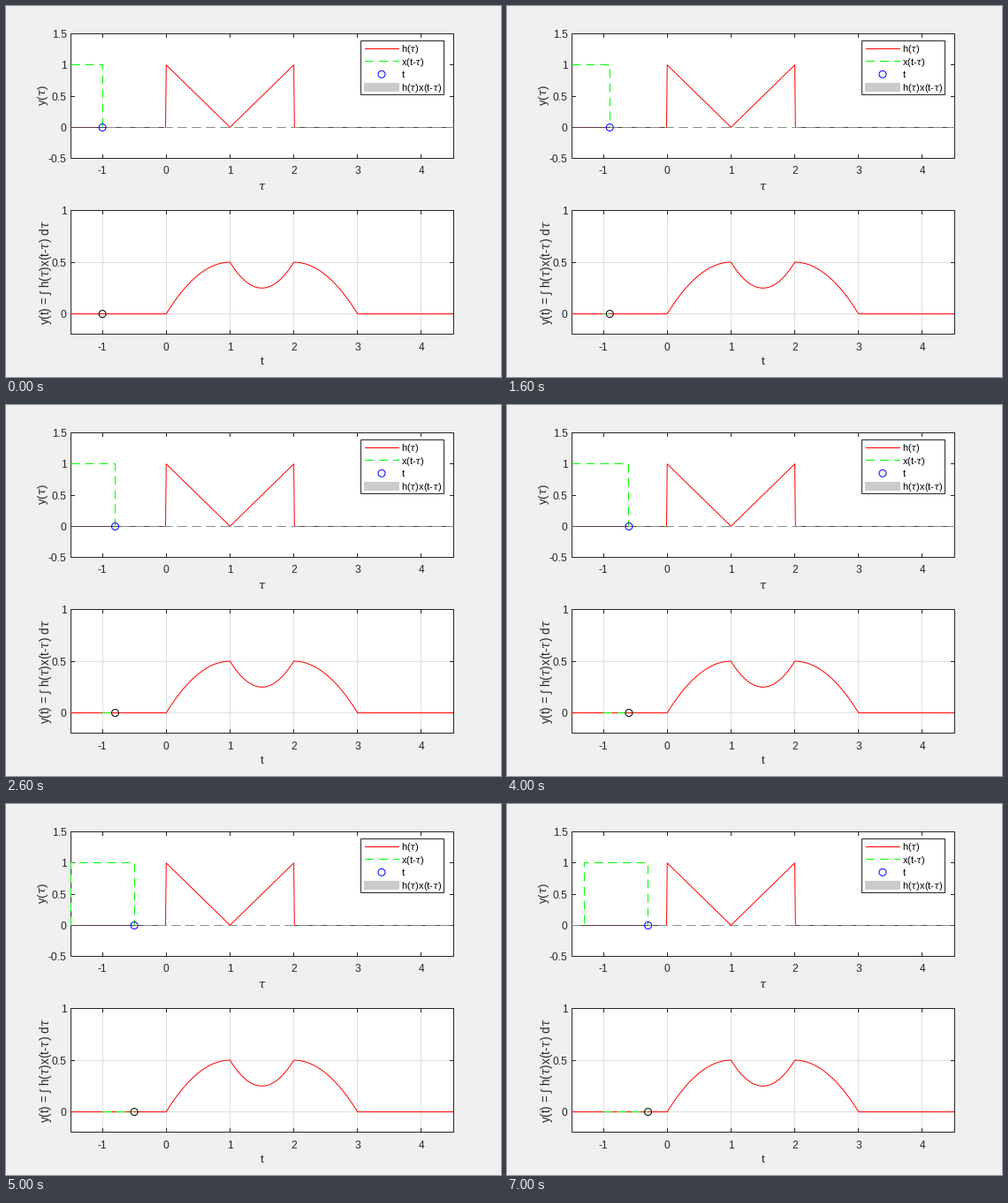
These frames come from a looping animation (560x420 px, 8000 ms). A matplotlib script:

```python
import numpy as np
import matplotlib.pyplot as plt
from matplotlib.animation import FuncAnimation
from matplotlib.patches import Circle, Rectangle

W, H, DPI = 560, 420, 100
PX = 72 / DPI
STEPS, STEP_MS = 8, 1000
INK = (38 / 255,) * 3
GRID = (223 / 255,) * 3
RED, GREEN, BLUE = "#ff0000", "#00ff00", "#0000ff"
DARK, GRAY, AREA = "#603c3c", "#8c8c8c", "#cbcbcb"
LEFT, RIGHT = 73, 506

plt.rcParams.update({
    "font.family": "Liberation Sans",
    "mathtext.fontset": "custom",
    "mathtext.rm": "Liberation Sans",
    "mathtext.it": "DejaVu Serif:italic",
    "path.snap": False,
    "path.simplify": False,
})

fig = plt.figure(figsize=(W / DPI, H / DPI), dpi=DPI, facecolor="#f0f0f0")
ax = fig.add_axes([0, 0, 1, 1])
ax.set(xlim=(0, W), ylim=(H, 0))
ax.axis("off")


def mid(v):
    """Centre of the pixel that holds v, for crisp lines."""
    return np.floor(v) + 0.5


def px(v):
    return LEFT + (np.asarray(v) + 1.5) * (RIGHT - LEFT) / 6


class Panel:
    def __init__(self, top, bottom, lo, hi):
        self.top, self.bottom, self.lo, self.hi = top, bottom, lo, hi

    def y(self, v):
        return self.bottom - (np.asarray(v) - self.lo) * (
            self.bottom - self.top) / (self.hi - self.lo)


def line(x, y, color, z=3, dashed=False):
    style = {"dashes": (10, 6)} if dashed else {"solid_capstyle": "butt"}
    return ax.plot(x, y, color=color, lw=PX, zorder=z, **style)[0]


def ring(x, y, color, z=6):
    return ax.add_patch(Circle((x, y), 4, fc="none", ec=color, lw=PX,
                               zorder=z))


def text(x, y, s, size=12, color=INK, ha="center", **kw):
    ax.text(x, y, s, fontsize=size * PX, color=color, ha=ha,
            va="baseline", zorder=9, **kw)


def box(x0, y0, x1, y1, face, edge, z):
    ax.add_patch(Rectangle((x0, y0), x1 - x0, y1 - y0, fc=face, ec=edge,
                           lw=PX, zorder=z))


def draw_panel(p, yticks, grid):
    left, right, top, bottom = mid([LEFT, RIGHT, p.top, p.bottom])
    box(left, top, right, bottom, "white", "none", 0)
    box(left, top, right, bottom, "none", INK, 2)
    for v in range(-1, 5):
        x = mid(px(v))
        if grid:
            line([x, x], [top, bottom], GRID, 1)
        for edge, d in ((top, 4.5), (bottom, -4.5)):
            line([x, x], [edge, edge + d], INK, 2)
        text(px(v), bottom + 18, str(v))
    for v in yticks:
        y = mid(p.y(v))
        if grid and p.lo < v < p.hi:
            line([left, right], [y, y], GRID, 1)
        for edge, d in ((left, 4.5), (right, -4.5)):
            line([edge, edge + d], [y, y], INK, 2)
        text(68.7, y + 4.5, f"{v:g}", ha="right")


def response(t):
    """Convolution of h(tau) = |tau - 1| on [0, 2] with a unit pulse."""
    t = np.asarray(t, float)
    return np.select(
        [t < 0, t < 1, t < 2, t < 3],
        [0 * t, t - t**2 / 2, ((2 - t)**2 + (t - 1)**2) / 2,
         0.5 - (t - 2)**2 / 2], 0.0)


def pulse(t):
    """Corners of the mirrored unit pulse, from the left edge on."""
    rise = round(t - 1, 6)
    if rise < -1.5:
        pts = [(-1.5, 1)]
    else:
        pts = [(-1.5, 0), (rise, 0), (rise, 1)]
    return np.array(pts + [(t, 1), (t, 0), (4.5, 0)]).T


def draw_legend():
    box(401.5, 39.5, 495.5, 100.5, "white", INK, 7)
    line([406, 445], [48.5, 48.5], RED, 8)
    line([406, 445], [62.5, 62.5], GREEN, 8, dashed=True)
    ring(425, 77.3, BLUE, 8)
    box(405, 87, 445, 97, AREA, "none", 8)
    labels = (r"h($\tau$)", r"x(t-$\tau$)", "t", r"h($\tau$)x(t-$\tau$)")
    for y, s in zip((52, 67, 81, 96), labels):
        text(447.4, y, s, 11, "black", "left")


upper = Panel(31.5, 172.5, -0.5, 1.5)
lower = Panel(231.5, 371.95, -0.2, 1)
draw_panel(upper, (-0.5, 0, 0.5, 1, 1.5), False)
draw_panel(lower, (0, 0.5, 1), True)

side = dict(rotation=90, rotation_mode="anchor")
text(44.5, 101.5, r"y($\tau$)", 13.2, **side)
text(49, 301.5, r"y(t) = ∫ h($\tau$)x(t-$\tau$) d$\tau$", 13.5, **side)
text(290, 208, r"$\tau$", 13.2)
text(290, 406.5, "t", 13.2)
draw_legend()

# impulse response; its flat parts lie under the area baseline
zero = mid(upper.y(0))
line(px([-0.01, 0, 1, 2, 2.01]), upper.y([0, 1, 0, 1, 0]), RED)
for ends in ((-1.5, -0.01), (2.01, 4.5)):
    line(px(ends), [zero, zero], DARK)

ts = np.linspace(-1.5, 4.5, 601)
line(px(ts), lower.y(response(ts)), RED)

edge = line([], [], GREEN, 4, dashed=True)
base = line([], [], GRAY, 4.1, dashed=True)
base.set_clip_path(Rectangle((LEFT, zero - 0.5), RIGHT - LEFT, 1,
                             transform=ax.transData))
trail = line([], [], GREEN, 4, dashed=True)
top_ring = ring(0, 0, BLUE)
low_ring = ring(0, 0, "black")


def update(i):
    t = -1 + 0.1 * i
    x, y = pulse(t)
    for part in (edge, base):
        part.set_data(mid(px(x)), mid(upper.y(y)))
    past = np.linspace(-1, t, 2 + 10 * i)
    trail.set_data(px(past), lower.y(response(past)))
    top_ring.center = px(t), zero
    low_ring.center = px(t), lower.y(response(t))
    return edge, base, trail, top_ring, low_ring


anim = FuncAnimation(fig, update, frames=STEPS, interval=STEP_MS,
                     repeat=True, repeat_delay=0, blit=False)
plt.show()
```
